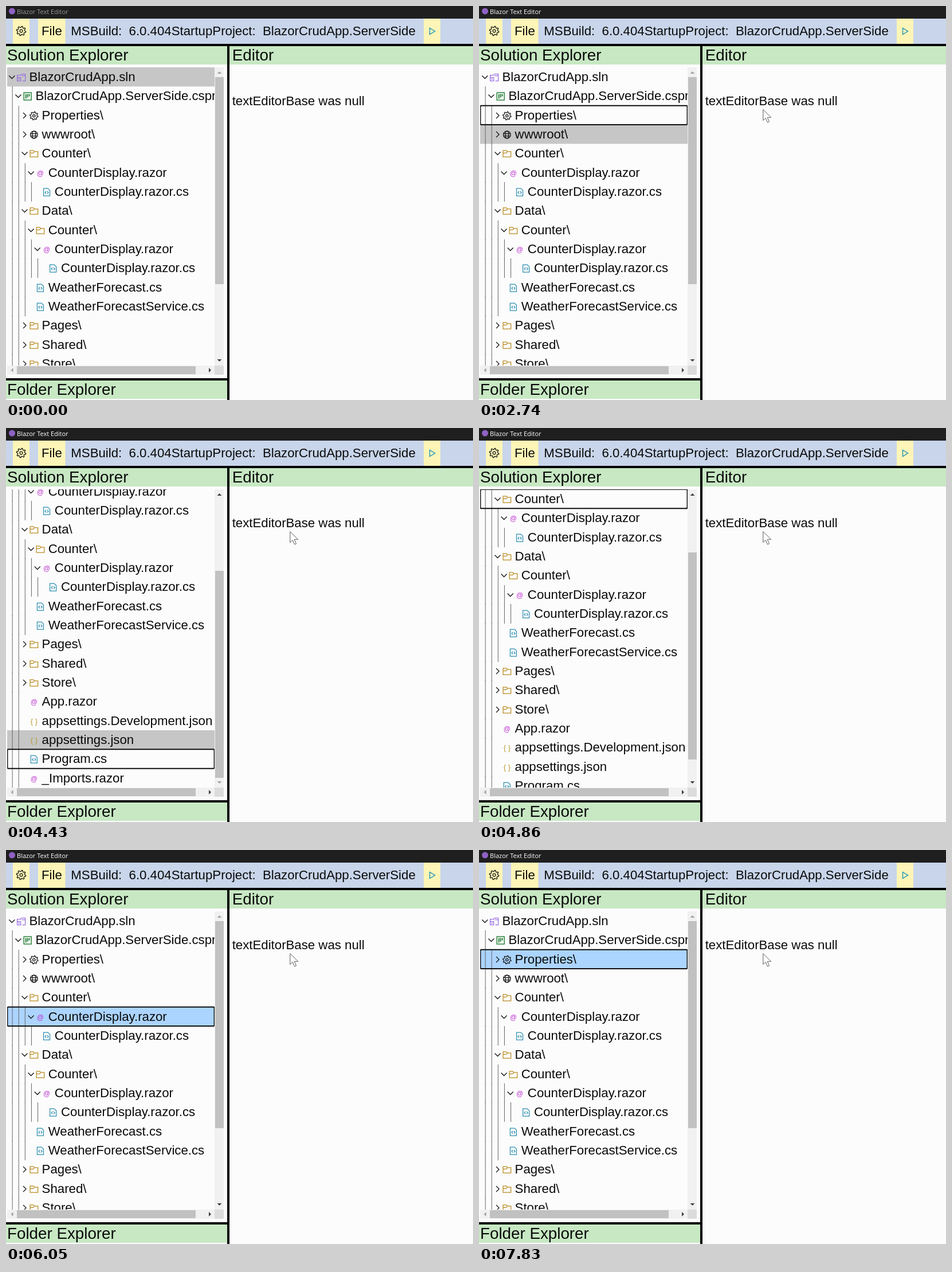
An HTML page that plays this animation: 815 by 687 pixels, repeating every 8 s.

```html
<!DOCTYPE html>
<html lang="en">
<head>
<meta charset="utf-8">
<title>Text editor</title>
<style>
  html, body { margin: 0; width: 100%; height: 100%; overflow: hidden; background: #fcfcfc; }
  svg { display: block; width: 815px; height: 687px; }
  text { font: 22.22px "Liberation Sans", Arial, sans-serif; fill: #0a0a0a; white-space: pre; }
  text.head { font-size: 27.78px; }
  text.title { font: 11px "Open Sans", sans-serif; }
  .line { fill: none; stroke-width: 1.25; }
</style>
</head>
<body>
<svg id="stage" viewBox="0 0 815 687"></svg>
<script>
const LOOP = 8000, TOP = 107, ROW = 100 / 3, VIEW = 520, INDENT = 100 / 9;

// depth, icon, label, chevron (v open, > closed)
const rows = [
  [0, 'sln', 'BlazorCrudApp.sln', 'v'],
  [1, 'proj', 'BlazorCrudApp.ServerSide.csproj', 'v'],
  [2, 'gear', 'Properties\\', '>'],
  [2, 'globe', 'wwwroot\\', '>'],
  [2, 'folder', 'Counter\\', 'v'],
  [3, 'razor', 'CounterDisplay.razor', 'v'],
  [4, 'cs', 'CounterDisplay.razor.cs'],
  [2, 'folder', 'Data\\', 'v'],
  [3, 'folder', 'Counter\\', 'v'],
  [4, 'razor', 'CounterDisplay.razor', 'v'],
  [5, 'cs', 'CounterDisplay.razor.cs'],
  [3, 'cs', 'WeatherForecast.cs'],
  [3, 'cs', 'WeatherForecastService.cs'],
  [2, 'folder', 'Pages\\', '>'],
  [2, 'folder', 'Shared\\', '>'],
  [2, 'folder', 'Store\\', '>'],
  [2, 'razor', 'App.razor'],
  [2, 'json', 'appsettings.Development.json'],
  [2, 'json', 'appsettings.json'],
  [2, 'cs', 'Program.cs'],
  [2, 'razor', '_Imports.razor']
];

// time, active row, focused row (same as active when left out)
const steps = [
  [0, 0, -1], [940, 0, 1], [1010, 1],
  [2270, 2, 1], [2340, 2], [2740, 3, 2],
  ...[5, 7, 9, 11, 13, 15, 17, 19, 20].map((r, i) => [2810 + i * 70, r]),
  [3830, 19, 20], [3920, 19], [4380, 18, 19],
  ...[16, 14, 12, 9, 7, 5].map((r, i) => [4450 + i * 68, r]),
  [4860, 3, 4], [4910, 1], [4980, 0],
  [5440, 1, 0], [5510, 1], [5590, 2, 1], [5660, 2], [5730, 3], [5830, 4, 3], [5900, 4],
  [6050, 5], [6160, 6], [6270, 7, 6], [6340, 7], [6490, 8],
  [6760, 7], [6830, 6, 7], [6960, 6], [7090, 7], [7170, 6],
  [7360, 5], [7430, 4, 5], [7520, 4], [7630, 3], [7830, 2]
];

// each focused row is brought into view by the shortest scroll
let scroll = 0;
const states = steps.map(([time, active, focus = active]) => {
  const y = Math.max(focus, 0) * ROW;
  scroll = Math.max(Math.min(scroll, y), y + ROW - VIEW);
  return { time, active, focus, scroll };
});
const maxScroll = rows.length * ROW - VIEW;

// pointer: time, x, y
const path = [[130, 756, 644], [350, 610, 455], [600, 340, 190], [760, 250, 124], [870, 244, 148],
  [1080, 244, 148], [1300, 390, 168], [1500, 488, 182], [1610, 495, 180]];

const rect = (x, y, w, h, fill, more = '') =>
  `<rect x="${x}" y="${y}" width="${w}" height="${h}" fill="${fill}" ${more}/>`;
const text = (x, y, s, more = '') => `<text x="${x}" y="${y}" ${more}>${s}</text>`;
const line = (d, color, more = '') => `<path class="line" d="${d}" stroke="${color}" ${more}/>`;
const at = (x, y, body) => `<g transform="translate(${x} ${y})">${body}</g>`;

function gear(r) {
  let d = '';
  for (let i = 0; i < 32; i++) {
    const a = (i + .5) * Math.PI / 16, k = i % 4 < 2 ? r : r * .74;
    d += (i ? 'L' : 'M') + (Math.cos(a) * k).toFixed(2) + ' ' + (Math.sin(a) * k).toFixed(2);
  }
  return line(d + 'Z', '#111') + `<circle class="line" r="${r * .3}" stroke="#111"/>`;
}

const icons = {
  sln: line('M-7 2V-4H-1L1-6H7V6H2', '#9a6ee0') + line('M-7 0H-1V6H-7ZM1-3H7', '#9a6ee0') +
    rect(-5, 2, 2, 2, '#9a6ee0'),
  proj: rect(-6.5, -6.5, 13, 13, 'none', 'stroke="#2f8540" stroke-width="1.5"') +
    rect(-4, -4, 2, 8, '#2f8540') + rect(-1, -4, 2, 6, '#2f8540') + rect(2, -4, 2, 4, '#2f8540'),
  gear: gear(7.2),
  globe: '<circle class="line" r="6.3" stroke="#111"/><ellipse class="line" rx="2.8" ry="6.3" stroke="#111"/>' +
    line('M-6-2H6M-6 2H6', '#111'),
  folder: line('M-6.8 5.6V-5.6H-1.2L.8-3.7H6.8V5.6ZM-6.8-1.2H-1.2L.8-3.4', '#b98a1f'),
  razor: text(0, 4, '@', 'text-anchor="middle" style="font-size:12px;fill:#bd32d0"'),
  cs: line('M-5.5-6.5H2L5.5-3V6.5H-5.5ZM-1-1.5L-3 .7L-1 2.9M1-1.5L3 .7L1 2.9', '#2c8eb0'),
  json: text(0, 4, '{ }', 'text-anchor="middle" style="font-size:13px;fill:#b99a2c"')
};
const chevrons = { v: 'M-5-2.5L0 2.5L5-2.5', '>': 'M-2.5-5L2.5 0L-2.5 5' };

function treeRow([depth, icon, label, chevron]) {
  const x = depth * INDENT;
  let out = '';
  for (let k = 1; k <= depth; k++) out += rect(k * INDENT - .5, 0, 1, 34, '#666');
  if (chevron) out += at(10.3 + x, 17, line(chevrons[chevron], '#111'));
  return `<g class="row">${out}${at(26.6 + x, 17.5, icons[icon])}${text(40.4 + x, 24, label)}</g>`;
}

const green = '#c7e8c3', yellow = '#fdf5b7';
const stage = document.getElementById('stage');
stage.innerHTML =
  '<clipPath id="view"><rect x="2" y="107" width="362" height="520"/></clipPath>' +
  rect(0, 0, 815, 687, '#fcfcfc') +
  rect(0, 0, 815, 22, '#1f1f1f') +
  '<circle cx="10.5" cy="9" r="5.5" fill="#8f62c4"/>' +
  text(19, 13.5, 'Blazor Text Editor', 'class="title" id="title"') +
  rect(0, 22, 815, 44, '#c8d5ea') +
  rect(12, 22, 29, 44, yellow) + rect(56, 22, 47.5, 44, yellow) + rect(729, 22, 29, 44, yellow) +
  at(26.5, 43.5, gear(8.2)) + text(62, 51, 'File') +
  text(113.3, 51, 'MSBuild:  6.0.404StartupProject:  BlazorCrudApp.ServerSide') +
  line('M739.5 38.5V49.5L748.5 44Z', '#1f92b8', 'style="stroke-width:1.4"') +
  rect(0, 70, 386, 32, green) + rect(390, 70, 425, 32, green) + rect(0, 653, 386, 32, green) +
  rect(0, 66, 815, 4, '#000') + rect(386, 66, 4, 621, '#000') + rect(0, 649, 386, 4, '#000') +
  text(2, 95, 'Solution Explorer', 'class="head"') +
  text(394.7, 95, 'Editor', 'class="head"') +
  text(2, 678, 'Folder Explorer', 'class="head"') +
  text(394.7, 173, 'textEditorBase was null') +
  '<g clip-path="url(#view)">' +
  rect(2, 0, 362, ROW, '#c6c6c6', 'id="fill"') + rows.map(treeRow).join('') +
  rect(2.4, 0, 361.2, ROW, 'none', 'id="ring" rx="2" stroke="#101010" stroke-width="2"') +
  '</g>' +
  rect(364, 107, 16, 520, '#f1f1f1') + rect(2, 627, 362, 16, '#f1f1f1') + rect(364, 627, 16, 16, '#dcdcdc') +
  rect(365, 124, 15, 361, '#c1c1c1', 'id="thumb"') + rect(19, 628, 312, 14, '#c1c1c1') +
  '<path id="up" d="M368.5 118H376.5L372.5 114Z"/><path id="down" d="M368.5 616H376.5L372.5 620Z"/>' +
  '<path d="M12.5 631V639L8.5 635Z" fill="#a3a3a3"/><path d="M354 631V639L358 635Z" fill="#404040"/>' +
  '<path id="pointer" d="M.8.5V19.5L5.2 15.5L8.5 23L11.5 21.7L8.2 14.3H14.7Z" fill="#fff" stroke="#5a5a5a"/>';

const el = id => document.getElementById(id);
const [title, fill, ring, thumb, up, down, pointer] =
  ['title', 'fill', 'ring', 'thumb', 'up', 'down', 'pointer'].map(el);
const rowNodes = [...document.querySelectorAll('.row')];
const last = (list, test) => list.filter(test).pop();

function movePointer(t) {
  pointer.style.display = t < 130 ? 'none' : '';
  // the pointer is redrawn about every 74 ms
  const s = t >= 1610 ? 1610 : 130 + Math.floor((t - 130) / 74) * 74;
  const i = Math.max(0, path.findIndex(p => p[0] > s) - 1);
  const a = s >= 1610 ? path[path.length - 1] : path[i], b = s >= 1610 ? a : path[i + 1];
  const k = a === b ? 0 : Math.max(0, (s - a[0]) / (b[0] - a[0]));
  pointer.setAttribute('transform',
    `translate(${Math.round(a[1] + (b[1] - a[1]) * k)} ${Math.round(a[2] + (b[2] - a[2]) * k)})`);
}

function draw(t) {
  const s = last(states, q => q.time <= t);
  const rowY = i => TOP + i * ROW - s.scroll;
  title.style.fill = t < 940 ? '#9a9a9a' : '#fff';
  // rows sit on whole pixels so that their text stays sharp
  rowNodes.forEach((node, i) =>
    node.setAttribute('transform', `translate(0 ${Math.floor(rowY(i) + .44)})`));
  fill.setAttribute('y', Math.round(rowY(s.active)));
  fill.setAttribute('fill', s.active === s.focus ? '#abd4fe' : '#c6c6c6');
  ring.setAttribute('y', rowY(s.focus));
  ring.style.display = s.focus < 0 ? 'none' : '';
  thumb.setAttribute('y', Math.round(124 + s.scroll / maxScroll * 125));
  up.setAttribute('fill', s.scroll < 1 ? '#a3a3a3' : '#404040');
  down.setAttribute('fill', s.scroll > maxScroll - 1 ? '#a3a3a3' : '#404040');
  movePointer(t);
}

const start = performance.now();
function tick() {
  draw((performance.now() - start) % LOOP);
  requestAnimationFrame(tick);
}
tick();
</script>
</body>
</html>
```
